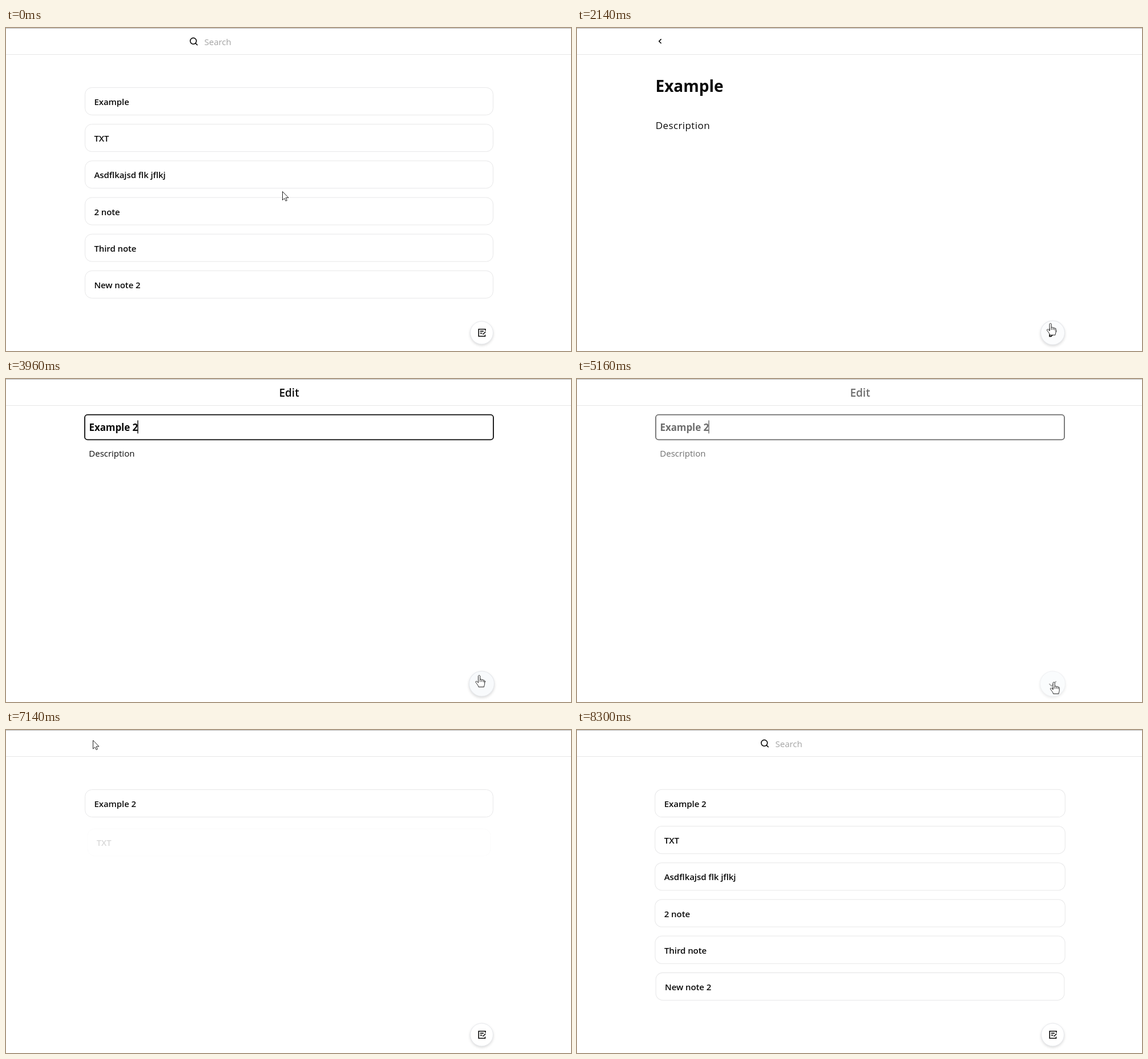
Write an HTML page that moves like this. It is 990 by 566 pixels and loops after 8370 ms.

```html
<!DOCTYPE html>
<html lang="en">
<head>
<meta charset="utf-8">
<title>Notes</title>
<style>
  html, body { margin: 0; width: 100%; height: 100%; overflow: hidden; background: #fff; }
  svg { display: block; font-family: "Open Sans", "Noto Sans", sans-serif; }
  text { fill: #0a0a0a; white-space: pre; }
  .line { fill: none; stroke: #0a0a0a; stroke-width: 1.6; }
  .item rect { fill: #fff; stroke: #e7e7e8; }
  .item text { font-size: 15px; font-weight: 600; letter-spacing: -.08px; }
  .title { font-size: 28px; font-weight: 700; }
  .body { font-size: 17px; letter-spacing: .41px; }
  .field { font-size: 17px; font-weight: 700; letter-spacing: -.1px; }
  .disc { stroke: #e5e7eb; filter: drop-shadow(0 2px 2px rgba(0, 0, 0, .14)); }
  .pointer { fill: #fff; stroke: #222; stroke-width: 1; stroke-linejoin: round; }
</style>
</head>
<body>
<svg width="990" height="566" viewBox="0 0 990 566">
  <path d="M0 .5H990" stroke="#b8b8b8"/>
  <path d="M0 46.5H990" stroke="#e6e6e7"/>

  <g id="search">
    <circle class="line" cx="328.2" cy="22.8" r="5.4"/>
    <path class="line" d="M332 26.6L335.6 30.2"/>
    <text x="347.5" y="30" font-size="15" style="fill:#a3a3a3">Search</text>
  </g>
  <g id="items"></g>

  <g id="detail">
    <path class="line" d="M147.6 19.4L143.8 23.2L147.6 27"/>
    <text id="detailTitle" class="title" x="137.5" y="112"></text>
    <text class="body" x="137.7" y="177">Description</text>
  </g>

  <g id="edit">
    <text x="496" y="31" font-size="19" font-weight="600" text-anchor="middle">Edit</text>
    <rect x="138" y="62.6" width="716" height="43.8" rx="5" fill="#fff" stroke="#0a0a0a" stroke-width="1.8"/>
    <text id="fieldText" class="field" x="145.5" y="91"></text>
    <path id="caret" d="M0 72.5V95.5" stroke="#000" stroke-width="1.4"/>
    <text x="145.3" y="136.3" font-size="15">Description</text>
  </g>

  <g id="button">
    <circle id="disc" class="disc" r="20"/>
    <g class="line">
      <path id="noteIcon" d="M6.5-3.5V-6.3H-5.3V6.2H6V3.5M-2.8-2.6H3.4M-2.8.8H1M6.8-1.8L2 3"/>
      <path id="penIcon" d="M-5.2 6V3.4L2.6-4.4L5.2-1.8L-2.6 6ZM1-3L4-.2M2.8-5.6L6.2-2.2"/>
      <path id="checkIcon" d="M-5.6 0L-2 3.7L5.6-3.9"/>
    </g>
  </g>

  <g id="cursor" class="pointer">
    <path id="arrow" d="M.5.5V15.6L3.8 12.4L6.2 17.2L8.4 16.1L6.1 11.4H11Z"/>
    <g id="hand">
      <path d="M-2 1.7C-2-.5 1.2-.5 1.2 1.7V8C1.2 6.3 4.2 6.5 4.2 8.4C4.3 7 7 7.2 7 9.2C7.2 8 9.2 8.3 9.2 10V14.5C9.2 17 8 18 8 20.5H-1.5C-1.5 18-5 14.5-6.4 12.3C-7.3 10.6-5 9.8-3.8 11.2L-2 13Z"/>
      <path d="M-2 9V13M1.2 8V11.5M4.2 8.5V11.5M7 9.5V12" fill="none"/>
    </g>
  </g>
</svg>
<script>
const LOOP = 8370;
const CENTER = { x: 496, button: [833.5, 534] };
const NOTES = ["Example", "TXT", "Asdflkajsd flk jflkj", "2 note", "Third note", "New note 2"];
// Hover intervals of the first three notes
const HOVERS = [[540, 900], [350, 470], [125, 300]];
// Pointer stops: time, x, y
const STOPS = [
  [60, 484, 286], [700, 461.5, 124.5], [1500, 461.5, 124.5],
  [2130, 830, 517.5], [2270, 829.5, 519.2], [4620, 829.5, 519.2],
  [5000, 836, 531.2], [6170, 836, 531.2], [6730, 185, 6.5], [6940, 152, 17.5]
];

const $ = id => document.getElementById(id);
const clamp = v => Math.min(1, Math.max(0, v));
const ramp = (t, a, b) => clamp((t - a) / (b - a));
const smooth = (t, a, b) => { const p = ramp(t, a, b); return p * p * (3 - 2 * p); };
const easeOut = (t, a, b) => 1 - (1 - ramp(t, a, b)) ** 3;
const during = (t, inStart, inEnd, outStart, outEnd) =>
  easeOut(t, inStart, inEnd) * (1 - smooth(t, outStart, outEnd));
const fade = (el, v) => el.setAttribute("opacity", v.toFixed(3));
const place = (el, x, y, scale = 1) =>
  el.setAttribute("transform", `translate(${x} ${y}) scale(${scale})`);

$("items").innerHTML = NOTES.map(name => `<g class="item">
  <rect x="-357.5" y="-24" width="715" height="48" rx="12"/><text x="-341.6" y="6.6">${name}</text></g>`).join("");
const items = [...$("items").children];

function pointerAt(t) {
  const next = STOPS.findIndex(s => s[0] > t);
  if (next === 0) return STOPS[0].slice(1);
  if (next < 0) return STOPS.at(-1).slice(1);
  const [a, ax, ay] = STOPS[next - 1], [b, bx, by] = STOPS[next];
  const p = smooth(t, a, b);
  return [ax + (bx - ax) * p, ay + (by - ay) * p];
}

function drawItems(t) {
  const leaving = smooth(t, 750, 865);
  items.forEach((item, i) => {
    let scale, opacity, dy = 0;
    if (t < 4000) {
      const [start, end] = HOVERS[i] || [LOOP, LOOP];
      const hover = smooth(t, start, start + 250) * (1 - smooth(t, end, end + 150));
      scale = 1 + .0045 * hover + .028 * leaving;
      opacity = 1 - leaving;
    } else {
      const start = 6990 + i * 140;
      const enter = easeOut(t, start, start + 210);
      const swell = smooth(t, 7910 + i * 70, 8050 + i * 70);
      scale = .985 + .015 * enter + .005 * swell;
      opacity = enter;
      dy = 5 * (1 - enter);
    }
    place(item, CENTER.x, 128.4 + i * 64.2 + dy, scale);
    fade(item, opacity);
  });
  items[0].lastChild.textContent = t < 4000 ? "Example" : "Example 2";
  fade($("search"), t < 4000 ? 1 - leaving : smooth(t, 7180, 7900));
}

function drawCaret(t) {
  const on = t < 2940 || (t >= 3470 && t < 4470) || t >= 5000;
  const x = t < 3630 ? 216 : t < 3960 ? 220 : 231;
  fade($("caret"), on ? 1 : 0);
  place($("caret"), x, 0);
}

function draw(t) {
  const list = t < 4000 ? 1 - smooth(t, 750, 865) : easeOut(t, 6940, 7000);
  const detail = t < 4000 ? during(t, 890, 1270, 2260, 2380) : during(t, 5260, 5740, 6880, 6960);
  const edit = during(t, 2400, 2940, 5100, 5240);

  drawItems(t);
  drawCaret(t);
  fade($("detail"), detail);
  fade($("edit"), edit);
  $("detailTitle").textContent = t < 4000 ? "Example" : "Example 2";
  $("fieldText").textContent = t < 3630 ? "Example" : t < 3960 ? "Example " : "Example 2";

  const [x, y] = pointerAt(t);
  const [bx, by] = CENTER.button;
  const over = Math.hypot(x - bx, y - by) < 21;
  const hover = smooth(t, 2050, 2230) * (1 - smooth(t, 6280, 6450));
  const press = t < 900 ? .03 * smooth(t, 750, 865) : 0;
  place($("button"), bx, by, 1 + .1 * hover + press);
  fade($("button"), Math.max(list, detail, edit));
  $("disc").style.fill = `rgb(${255 - 7 * hover},${255 - 5 * hover},${255 - 3 * hover})`;
  fade($("noteIcon"), list);
  fade($("penIcon"), detail);
  fade($("checkIcon"), edit);

  place($("cursor"), x, y);
  fade($("cursor"), t < 7500 ? 1 : 0);
  fade($("arrow"), over ? 0 : 1);
  fade($("hand"), over ? 1 : 0);
}

const begin = performance.now();
function tick() {
  draw((performance.now() - begin) % LOOP);
  requestAnimationFrame(tick);
}
tick();
</script>
</body>
</html>
```
